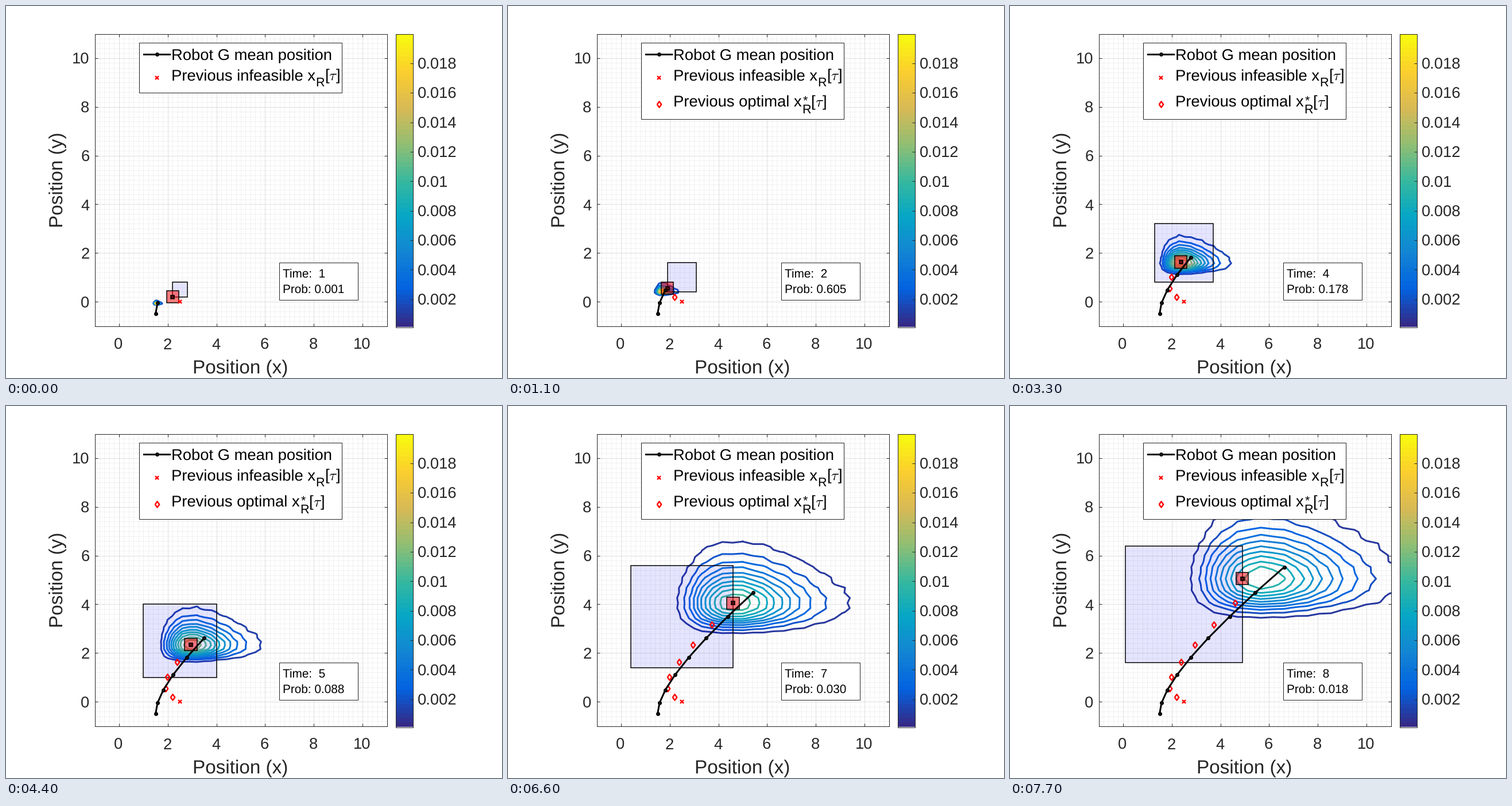
Write a matplotlib script that moves like this. It is 864 by 648 pixels and loops after 8 s.

```python
import numpy as np
import matplotlib.pyplot as plt
from matplotlib.animation import FuncAnimation
from matplotlib.collections import LineCollection
from matplotlib.colors import LinearSegmentedColormap
from matplotlib.patches import Rectangle

plt.rcParams.update({
    "font.family": "Liberation Sans",
    "mathtext.fontset": "cm",
    "text.hinting": "none",
    "toolbar": "None",
})

W, H, DPI = 864, 648, 72          # at 72 dpi one point is one pixel
INK = "#262626"
TICK, LABEL, NOTE, SUB = 27.4, 33.3, 20.8, 21.5
CMIN, CMAX = 0.0001, 0.02
STEP_MS, TICK_MS, LOOP_MS = 1100, 100, 8000

PARULA = LinearSegmentedColormap.from_list("parula", [
    "#352a87", "#0363e1", "#1485d4", "#06a7c6", "#38b99e",
    "#92bf73", "#d9ba56", "#fcce2e", "#f9fb0e"], N=64)

# robot G: double integrator driven by exponential accelerations
START = (1.5, -0.5)
SPEED = (0.0, 0.405)
ACCEL = (0.16, 0.0872)

CATCH = [(2.2, 0.2), (1.9, 0.555), (1.975, 1.02), (2.375, 1.63),
         (2.95, 2.34), (3.72, 3.16), (4.6, 4.05), (4.9, 5.05)]
PROB = [0.001, 0.605, 0.388, 0.178, 0.088, 0.049, 0.030, 0.018]

fig = plt.figure(figsize=(W / DPI, H / DPI), dpi=DPI, facecolor="white")


def add_axes(left, top, right, bottom, z):
    box = [left / W, 1 - bottom / H, (right - left) / W, (bottom - top) / H]
    return fig.add_axes(box, zorder=z)


ax = add_axes(154.5, 48.5, 663.5, 557.5, 1)
bar = add_axes(678.5, 48.5, 709, 559.5, 1)
px = add_axes(0, 0, W, H, 2)
px.set(xlim=(0, W), ylim=(H, 0))
px.axis("off")


def label(x, y, s, size=TICK, color="black", **kw):
    return px.text(x, y, s, fontsize=size, color=color, va="baseline", **kw)


def frame(x0, y0, x1, y1):
    return px.add_patch(Rectangle((x0, y0), x1 - x0, y1 - y0, fc="white",
                                  ec=INK, lw=1, zorder=1))


def style_box(a):
    for spine in a.spines.values():
        spine.set(color=INK, linewidth=1)


def draw_plot_area():
    ax.set(xlim=(-1, 11), ylim=(-1, 11))
    ticks = np.arange(0, 11, 2)
    ax.set_xticks(ticks)
    ax.set_yticks(ticks)
    ax.tick_params(direction="in", length=5, width=1, color=INK, top=True,
                   right=True, labelbottom=False, labelleft=False)
    style_box(ax)
    ax.grid(color="#dedede", lw=1)
    ax.set_axisbelow(True)
    minor = [v for v in np.arange(-0.8, 10.9, 0.2) if abs(v / 2 - round(v / 2)) > 0.01]
    lines = [[(v, -1), (v, 11)] for v in minor] + [[(-1, v), (11, v)] for v in minor]
    ax.add_collection(LineCollection(lines, colors="#cfcfcf", linewidths=0.8,
                                     linestyles=[(0, (1.25, 2.5))], zorder=0.4))
    for v in ticks:
        label(196.9 + 42.42 * v - 1, 597.5, str(v), color=INK, ha="center")
        label(145.5, 525.3 - 42.42 * v, str(v), color=INK, ha="right")
    label(408.5, 640, "Position (x)", LABEL, INK, ha="center")
    label(106.5, 302.5, "Position (y)", LABEL, INK, ha="right", rotation=90
          ).set(va="center")


def draw_colorbar():
    bar.imshow(np.linspace(0, 1, 64)[:, None], cmap=PARULA, origin="lower",
               aspect="auto", extent=(0, 1, CMIN, CMAX), interpolation="nearest")
    values = np.arange(1, 10) * 0.002
    bar.set_xticks([])
    bar.set_yticks(values)
    bar.tick_params(direction="in", length=5, width=1, color=INK, left=False,
                    right=True, labelleft=False)
    style_box(bar)
    for v in values:
        y = 559.5 - 511 * (v - CMIN) / (CMAX - CMIN)
        label(716.5, y + 10, f"{v:g}", color=INK)


RHOMBUS = [(-0.72, 0), (0, 1), (0.72, 0), (0, -1), (-0.72, 0)]
PATH = dict(color="black", lw=3, marker="o", ms=4.5, mew=2.5, mfc="#333333")
CROSS = dict(color="red", marker="x", ms=6, mew=2.4, ls="none")
DIAMOND = dict(color="red", marker=RHOMBUS, ms=10.4, mew=2.4, mfc="none", ls="none")


def draw_legend():
    box = frame(231.5, 64, 585, 150.5)
    px.plot([240, 285], [83.5, 83.5], color="black", lw=3)
    px.plot(262.5, 83.5, **PATH)
    label(288.5, 94, "Robot G mean position")
    px.plot(262.5, 124.5, **CROSS)
    label(288.5, 129.5, "Previous infeasible x")
    label(539.5, 140.5, "R", SUB)
    bracket_tau(555, 129.5)
    extra = px.plot(262.5, 171, **DIAMOND)
    extra.append(label(288.5, 175.5, "Previous optimal x"))
    extra.append(label(512, 187, "R", SUB))
    extra.append(label(513.5, 171.5, "*", SUB))
    extra += bracket_tau(527.5, 175.5)
    return box, extra


def bracket_tau(x, y):
    return [label(x, y, "["), label(x + 7.2, y, r"$\tau$", 25.5),
            label(x + 20.2, y, "]")]


def mean_pos(t):
    return [p + v * t + a * t * t / 2 for p, v, a in zip(START, SPEED, ACCEL)]


def density(u, t, accel):
    """Density of a weighted sum of t exponential accelerations."""
    s = (np.arange(t) + 0.5) * accel
    pos = np.clip(u, 0, None)
    total = np.zeros_like(u)
    for k in range(t):
        weight = np.prod(s[k] / (s[k] - np.delete(s, k)))
        total += weight / s[k] * np.exp(-pos / s[k])
    return np.where(u >= 0, total, 0)


def field(t):
    i = np.arange(-16, 46)
    ripple = np.where((i + t) % 2 == 0, 1, -1)
    axes, parts = [], []
    for m, p, v, a, h in zip(mean_pos(t), START, SPEED, ACCEL, (0.06, 0.03)):
        c = m + h * t * i
        axes.append(c)
        smooth = np.convolve(density(c - p - v * t, t, a), [0.25, 0.5, 0.25], "same")
        parts.append(smooth)
    z = np.outer(parts[1], parts[0])
    z = z / z.max() + 0.006 * (ripple[None, :] + ripple[:, None])
    peak = min(CMAX, 0.019 * (3 / t) ** 0.63)
    return axes[0], axes[1], z * peak, peak


def square(cx, cy, half, face, z):
    return ax.add_patch(Rectangle((cx - half, cy - half), 2 * half, 2 * half,
                                  fc=face, ec="black", lw=1.5, zorder=z))


draw_plot_area()
draw_colorbar()
legend_box, optimal_entry = draw_legend()
frame(475.5, 447, 613, 511.5)
time_text = label(482.5, 473, "", NOTE)
prob_text = label(482.5, 500, "", NOTE)

FIELDS = {t: field(t) for t in range(1, 9)}
TRACK = np.array([mean_pos(t) for t in range(9)])
ax.plot(2.5, 0, zorder=6, **CROSS)
path, = ax.plot([], [], zorder=7, **PATH)
past, = ax.plot([], [], zorder=6, **DIAMOND)
target, = ax.plot([], [], marker="s", ms=6, mew=1.6, mec="black", mfc="#5a0a0a",
                  ls="none", zorder=5)
state = {"t": 0, "items": []}


def show_step(t):
    for item in state["items"]:
        item.remove()
    x, y, z, peak = FIELDS[t]
    rings = ax.contour(x, y, z, levels=peak * np.arange(1, 11) / 11, cmap=PARULA,
                       vmin=CMIN, vmax=CMAX, linewidths=3, zorder=2)
    reach = square(2.5, 0.5 * t, 0.3 * t, (0, 0, 1, 0.1), 3)
    cx, cy = CATCH[t - 1]
    zone = square(cx, cy, 0.25, (1, 0, 0, 0.5), 4)
    state.update(t=t, items=[rings, reach, zone])
    target.set_data([cx], [cy])
    path.set_data(*TRACK[:t + 1].T)
    past.set_data([c[0] for c in CATCH[:t - 1]], [c[1] for c in CATCH[:t - 1]])
    legend_box.set_height(86.5 if t == 1 else 133)
    for item in optimal_entry:
        item.set_visible(t > 1)
    time_text.set_text(f"Time:  {t}")
    prob_text.set_text(f"Prob: {PROB[t - 1]:.3f}")


def update(n):
    t = n * TICK_MS // STEP_MS + 1
    if t != state["t"]:
        show_step(t)
    return []


anim = FuncAnimation(fig, update, frames=LOOP_MS // TICK_MS, interval=TICK_MS,
                     init_func=lambda: update(0), repeat=True, repeat_delay=0,
                     blit=False)
plt.show()
```
